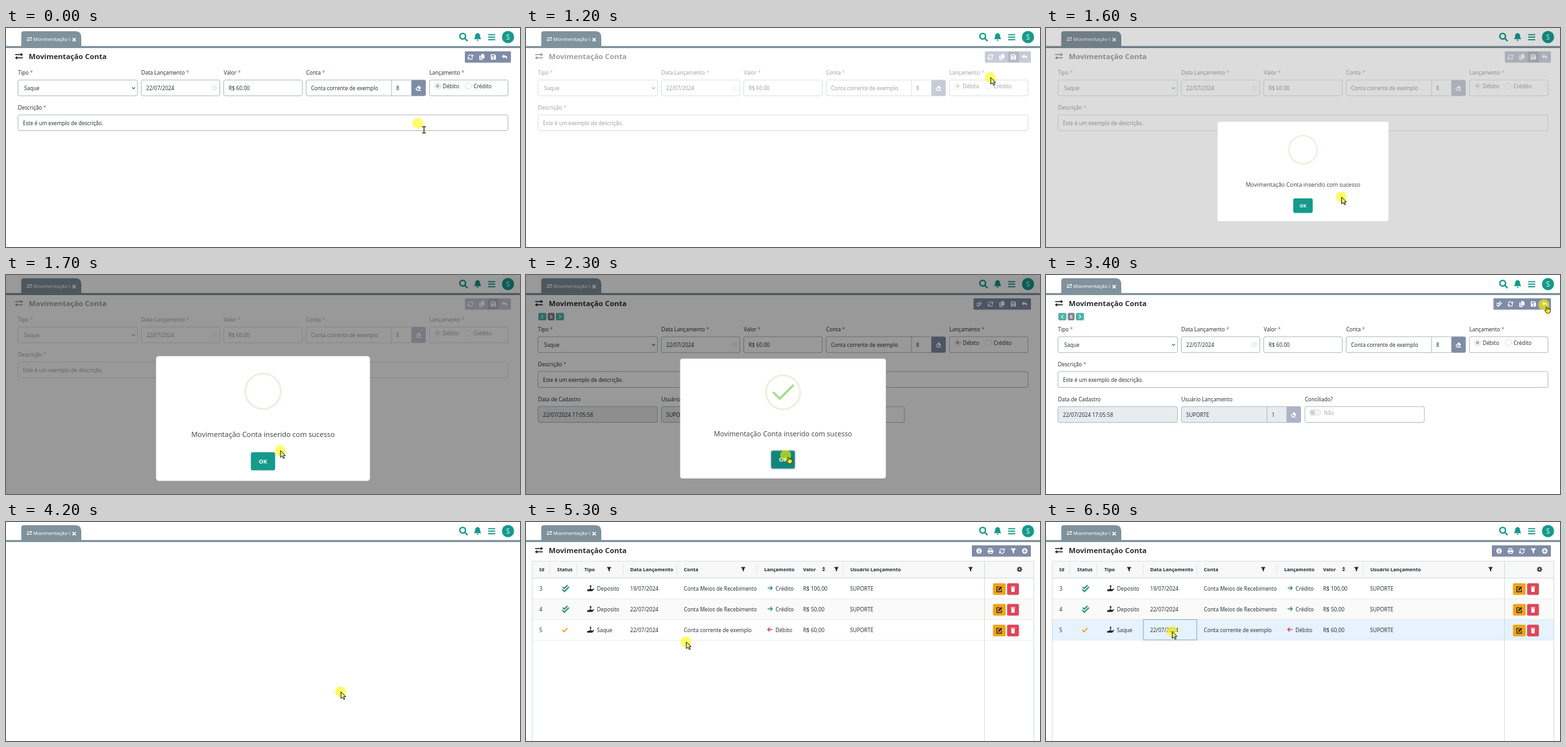
Write an HTML page that moves like this. It is 792 by 338 pixels and loops after 6600 ms.

```html
<!DOCTYPE html>
<html lang="pt-BR">
<head>
<meta charset="utf-8">
<title>Movimentação Conta</title>
<style>
html, body { margin: 0; width: 100%; height: 100%; overflow: hidden; background: #fff; }
svg { display: block; font-family: "Noto Sans", "Open Sans", sans-serif; }
</style>
</head>
<body>
<svg id="stage" width="792" height="338" viewBox="0 0 792 338"></svg>
<script>
const LOOP = 6600;
const INK = '#30343a', TEAL = '#159a8c', SLATE = '#808ca7', BAR = '#80929c', LINE = '#b3babf';
const stage = document.getElementById('stage');

// Icons in a 16 unit box around the origin: s = stroked part, w = its width, f = filled part
const RING = 'M-7.5 0A7.5 7.5 0 1 0 7.5 0A7.5 7.5 0 1 0-7.5 0Z';
const HAND = 'M-8 3H-5L-2 1H2C3 1 3 3 1.5 3H3L7 0C8 0 8.5 1 8 2L4 6.5H-8Z';
const ICONS = {
  swap: { s: 'M-7.5-3.2H5M-5 3.2H7.5', w: 2, f: 'M3.5-6.7L8-3.2L3.5 .3ZM-3.5-.3L-8 3.2L-3.5 6.7Z' },
  close: { s: 'M-5-5L5 5M-5 5L5-5', w: 3.4 },
  search: { s: 'M-6.5-1.5A5 5 0 1 0 3.5-1.5A5 5 0 1 0-6.5-1.5M2.5 2.5L7 7', w: 2.6 },
  bell: { f: 'M0-8C5-7 5-3 5 0L7 4H-7L-5 0C-5-3-5-7 0-8ZM-2 5.5H2A2 2 0 0 1-2 5.5Z' },
  menu: { s: 'M-7-5H7M-7 0H7M-7 5H7', w: 2.3 },
  refresh: { s: 'M-6-1A6 6 0 0 1 5-3.5M6 1A6 6 0 0 1-5 3.5', w: 2, f: 'M7.5-7.5V-1H1ZM-7.5 7.5V1H-1Z' },
  copy: { f: 'M-2-8H4L7-5V4H-2ZM-7-4H-3.5V5.5H3V8H-7Z' },
  save: { f: 'M-7-7H4L7-4V7H-7ZM-4.5-5V-1.5H3V-5ZM0 1A2 2 0 1 0 .01 1Z' },
  undo: { f: 'M-8-1.5L-2-7V-4C5-4 9-1 5 7C6 2 3 1-2 1V4Z' },
  info: { f: RING + 'M-1.2-4.8H1.2V-2.4H-1.2ZM-2-1H1.2V3H2V4.8H-2V3H-1V.8H-2Z' },
  plus: { f: RING + 'M-1.2-4.5H1.2V-1.2H4.5V1.2H1.2V4.5H-1.2V1.2H-4.5V-1.2H-1.2Z' },
  print: { f: 'M-5-7.5H3.5L5-6V-2H-5ZM-3-5.5V-2H3V-5.5ZM-8-2H8V4H5.5V7.5H-5.5V4H-8ZM-3.5 2.5V5.5H3.5V2.5Z' },
  filter: { f: 'M-7-7H7L2 0V7L-2 4V0Z' },
  sort: { f: 'M-4.5-1.5L0-7L4.5-1.5ZM-4.5 1.5L0 7L4.5 1.5Z' },
  gear: { s: 'M-4 0A4 4 0 1 0 4 0A4 4 0 1 0-4 0M0-7.5V-4M0 7.5V4M-7.5 0H-4M7.5 0H4M-5.4-5.4L-3-3M5.4 5.4L3 3M-5.4 5.4L-3 3M5.4-5.4L3-3', w: 2.8 },
  eraser: { f: 'M-8 2L1-7L7.5-.5L1 6H8V7.5H-3.5ZM-5.3 2L-2 5.5H-1L2 2.5L-2-1.3Z' },
  edit: { s: 'M1-5H-6V7H6V1', w: 2, f: 'M-3 4L-2 0L5-7L8-4L1 3Z' },
  trash: { f: 'M-6-7H-2L-1.3-8H1.3L2-7H6V-5H-6ZM-5-4H5L4.3 8H-4.3Z' },
  check: { s: 'M-6 0L-2 4.5L6-4.5', w: 2.6 },
  checks: { s: 'M-7 2L-2.5 6.5L7-3M-6-3L-2.5 0L4-6.5', w: 2.7 },
  deposit: { f: HAND + 'M0-8L3-4.5H1V0H-1V-4.5H-3Z' },
  withdraw: { s: 'M1.8-6C-2-8-2.5-4 0-4S2-.5-1.8-1.8M0-8V0', w: 1.2, f: HAND },
  right: { s: 'M-6 0H6M1-5L6 0L1 5', w: 2.2 },
  left: { s: 'M6 0H-6M-1-5L-6 0L-1 5', w: 2.2 },
  down: { s: 'M-6-3L0 3L6-3', w: 3 },
  prev: { s: 'M3-6L-3 0L3 6', w: 2.4 },
  next: { s: 'M-3-6L3 0L-3 6', w: 2.4 }
};

function el(parent, tag, attrs) {
  const node = document.createElementNS('http://www.w3.org/2000/svg', tag);
  for (const key in attrs) node.setAttribute(key, attrs[key]);
  return parent.appendChild(node);
}
const group = (p, attrs) => el(p, 'g', attrs);
const path = (p, d, stroke, width, fill = 'none') =>
  el(p, 'path', { d, stroke, 'stroke-width': width, fill });
const rect = (p, x, y, x2, y2, fill, rx = 0, stroke = 'none') =>
  el(p, 'rect', { x, y, width: x2 - x, height: y2 - y, fill, rx, stroke });
const circle = (p, cx, cy, r, fill, stroke = 'none', width = 1) =>
  el(p, 'circle', { cx, cy, r, fill, stroke, 'stroke-width': width });

function text(p, x, y, str, o = {}) {
  el(p, 'text', {
    x, y, fill: o.fill || INK, 'font-size': o.size || 8.1,
    'font-weight': o.weight || 400, 'text-anchor': o.anchor || 'start'
  }).textContent = str;
}

function icon(p, name, x, y, size, color) {
  const { s, w, f } = ICONS[name];
  const g = group(p, { transform: `translate(${x} ${y}) scale(${size / 16})` });
  if (f) el(g, 'path', { d: f, fill: color, 'fill-rule': 'evenodd' });
  if (s) path(g, s, color, w);
}

function label(p, x, y, str, required) {
  el(p, 'text', { x, y, fill: INK, 'font-size': 8.1 }).innerHTML =
    str + (required ? ' <tspan fill="#a56b6b">*</tspan>' : '');
}

function field(p, x, x2, y, value, fill = '#fff') {
  rect(p, x, y, x2, y + 24.5, fill, 2.5, LINE);
  text(p, x + 7.5, y + 15.6, value);
}

function lookup(p, x, mid, x2, y, name, id, fill, btn) {
  field(p, x, x2, y, name, fill);
  rect(p, x2 - 22, y, x2, y + 24.5, btn, 2);
  path(p, `M${mid} ${y}V${y + 24.5}`, LINE, 1);
  text(p, mid + 7.3, y + 15.6, id);
  icon(p, 'eraser', x2 - 11, y + 12.5, 9, '#fff');
}

function titleBar(p, left, icons) {
  icon(p, 'swap', 20, 43.5, 12.5, '#222');
  text(p, 35, 47.8, 'Movimentação Conta', { size: 11.3, weight: 600, fill: '#2a2d32' });
  rect(p, left, 36, 778, 53.5, SLATE, 1);
  icons.forEach((name, i) =>
    icon(p, name, 768.5 - (icons.length - 1 - i) * 17.6, 44.8, 9, '#fff'));
}

function radio(p, x, y, str, on) {
  circle(p, x, y, 4.8, '#fff', '#d3d6d9', .9);
  if (on) circle(p, x, y, 2.7, '#b4b6b9');
  text(p, x + 8, y + 3.8, str);
}

function form(p, saved) {
  const g = group(p), body = group(g, { transform: `translate(0 ${saved ? 15 : 0})` });
  titleBar(g, saved ? 689.5 : 707, (saved ? ['checks'] : []).concat('refresh', 'copy', 'save', 'undo'));
  [['Tipo', 18.5], ['Data Lançamento', 208.5], ['Valor', 335.5], ['Conta', 462.5], ['Lançamento', 652.5]]
    .forEach(([s, x]) => label(body, x, 72, s, true));
  field(body, 18.5, 202.5, 80.2, '');
  text(body, 28, 95.8, 'Saque');
  icon(body, 'down', 196.5, 92.7, 6, '#444');
  field(body, 208.5, 329.5, 80.2, '22/07/2024');
  circle(body, 321, 92.6, 3.8, '#f7f9f7', '#dfe6df', .9);
  path(body, 'M321 90.5V92.8L322.3 93.8', '#cfd6cf', .8);
  field(body, 335.5, 456.5, 80.2, 'R$ 60.00');
  lookup(body, 462.5, 594, 646.5, 80.2, 'Conta corrente de exemplo', '8', '#fff', SLATE);
  field(body, 652.5, 773.5, 80.2, '');
  radio(body, 665, 89.5, 'Débito', true);
  radio(body, 712.5, 89.5, 'Crédito', false);
  label(body, 18.5, 126, 'Descrição', true);
  field(body, 18.5, 773.5, 134, 'Este é um exemplo de descrição.');
  if (!saved) return g;

  rect(g, 19, 58.5, 31.5, 70, '#4fb3a6', 2);
  rect(g, 33.5, 58.5, 44, 70, '#7e848e', 2);
  rect(g, 46, 58.5, 58.5, 70, '#4fb3a6', 2);
  icon(g, 'prev', 25.2, 64.3, 7, '#fff');
  icon(g, 'next', 52.3, 64.3, 7, '#fff');
  text(g, 38.8, 67, '5', { size: 7.5, fill: '#fff', weight: 600, anchor: 'middle' });
  label(g, 18.5, 194.5, 'Data de Cadastro');
  label(g, 208.5, 194.5, 'Usuário Lançamento');
  label(g, 399, 194.5, 'Conciliado?');
  field(g, 18.5, 202.5, 203, '22/07/2024 17:05:58', '#e9ecef');
  lookup(g, 208.5, 340.5, 392.5, 203, 'SUPORTE', '1', '#e9ecef', '#adb4c5');
  field(g, 399, 583, 203, '');
  rect(g, 406, 207.5, 423.5, 216.8, '#f4f4f4', 4.6, '#e2e2e2');
  circle(g, 411, 212.2, 3.8, '#d2d2d2');
  text(g, 428, 216, 'Não', { fill: '#a9acb0' });
  return g;
}

// Header
rect(stage, 0, 0, 792, 338, '#fff');
path(stage, 'M23.5 28V9Q23.5 5 27.5 5H107Q116 5 116 14V28Z', 'none', 0, BAR);
rect(stage, 0, 27.8, 792, 31, BAR);
el(el(stage, 'clipPath', { id: 'tab' }), 'rect', { x: 24, y: 5, width: 75, height: 23 });
icon(stage, 'swap', 36, 17, 8.5, '#fff');
text(group(stage, { 'clip-path': 'url(#tab)' }), 42, 19.8, 'Movimentação Conta', { size: 7.6, fill: '#fff' });
icon(stage, 'close', 105, 18, 8, '#fff');
icon(stage, 'search', 705, 14, 14, TEAL);
icon(stage, 'bell', 726.7, 14, 12.5, TEAL);
icon(stage, 'menu', 748.3, 14.2, 12.5, TEAL);
circle(stage, 773.5, 14, 9.4, TEAL);
text(stage, 773.5, 17.6, 'S', { size: 10, fill: '#fff', anchor: 'middle' });

// Form before and after saving
const draft = form(stage, false);
const pressed = group(draft);
rect(pressed, 742.5, 36.5, 759.5, 53, '#5c6579', 1);
icon(pressed, 'save', 750.9, 44.8, 9, '#fff');
const saved = form(stage, true);
const veil = rect(stage, 0, 31, 792, 338, '#fff');

// List
const list = group(stage);
titleBar(list, 687, ['info', 'print', 'refresh', 'filter', 'plus']);
rect(list, 9.5, 60.5, 782.5, 345, '#fff', 0, '#d3dde6');
rect(list, 10, 61, 782, 86, '#f8f8f8');
path(list, 'M10 86.5H782', '#d3dde6', 1);
path(list, [36.5, 78.5, 149.5, 232.5, 355.5, 488.5].map(x => `M${x} 66V81`).join(''), '#dfe3e6', 1);
[['Id', 20.5], ['Status', 48], ['Tipo', 90], ['Data Lançamento', 160.5], ['Conta', 243.3],
 ['Lançamento', 367], ['Valor', 427], ['Usuário Lançamento', 499.7]]
  .forEach(([s, x]) => text(list, x, 76, s, { size: 7.5, weight: 600, fill: '#25282c' }));
[128, 334.7, 478.3, 685].forEach(x => icon(list, 'filter', x, 73, 8, '#222'));
icon(list, 'sort', 458.7, 72.8, 8, '#222');
icon(list, 'gear', 760.5, 73, 8.5, '#222');

const rows = group(list);
rect(rows, 10, 118, 782, 150, '#fafaf9');
const hover = rect(rows, 10, 150, 782, 182, '#e6f2fd');
path(rows, 'M10 118.5H782M10 150.5H782M10 182.5H782', '#e4e8ec', .8);
const cell = rect(rows, 150, 150.5, 232.3, 182, 'none', 0, '#86abd0');
[['3', '19/07/2024', 'R$ 100,00'], ['4', '22/07/2024', 'R$ 50,00'], ['5', '22/07/2024', 'R$ 60,00']]
  .forEach(([id, date, value], i) => {
    const y = 102.4 + i * 32, out = i === 2;
    const put = (x, s) => text(rows, x, y + 3.2, s, { size: 8.2 });
    put(20.5, id);
    icon(rows, out ? 'check' : 'checks', out ? 60 : 61, y, out ? 10.5 : 12, out ? '#f0a31f' : '#2f8f7d');
    icon(rows, out ? 'withdraw' : 'deposit', 99.5, y, 10.5, '#222');
    put(109.3, out ? 'Saque' : 'Deposito');
    put(160.5, date);
    put(243.3, out ? 'Conta corrente de exemplo' : 'Conta Meios de Recebimento');
    icon(rows, out ? 'left' : 'right', 376, y - .4, 9.5, out ? '#d9405a' : '#2f8f7d');
    put(384.5, out ? 'Débito' : 'Crédito');
    put(427, value);
    put(499.3, 'SUPORTE');
    rect(rows, 719.5, y - 8, 739, y + 10, '#efa31d', 2);
    icon(rows, 'edit', 729, y + 1, 9.5, '#222');
    rect(rows, 741.3, y - 8, 759.5, y + 10, '#df4459', 2);
    icon(rows, 'trash', 750.4, y + 1, 9, '#fff');
  });
path(list, 'M706.5 61V338', '#d3dde6', 1);

// Success dialog
const shade = rect(stage, 0, 0, 792, 338, '#000');
const modal = group(stage);
rect(modal, 237.5, 129, 554.5, 314, '#fff', 4);
circle(modal, 396, 181, 26.3, 'none', '#e6f2dc', 2.6);
const tick = path(modal, 'M381.5 181.5L391 191L411.5 170.5', '#a5dc86', 3.2);
tick.setAttribute('stroke-linecap', 'round');
tick.setAttribute('stroke-dasharray', '43 60');
text(modal, 396, 249.3, 'Movimentação Conta inserido com sucesso', { size: 10.49, fill: '#4a4c50', anchor: 'middle' });
const ring = rect(modal, 376.5, 270, 415.5, 300, '#b9c3da', 4);
const ok = rect(modal, 378, 271.5, 414, 298.5, TEAL, 3);
text(modal, 396, 288.4, 'OK', { size: 8.6, weight: 700, fill: '#fff', anchor: 'middle' });

// Pointer
const pointer = group(stage);
circle(pointer, 0, 0, 8.4, 'rgba(255,252,0,.58)');
const shapes = {
  beam: path(pointer, 'M6.5 5.3H12.7M9.6 5.3V15M6.5 15H12.7', '#5c5420', 1.7),
  hand: path(pointer, 'M3.5 3.5C4.6 3 5 4 5.4 6L10.3 7V10L8.6 13H4.6L1.3 9C2 7.8 3 8.4 3.9 9Z', '#222', .9, '#ffe81a'),
  arrow: path(pointer, 'M.5 0V10.5L3 8.3L5 12L6.6 11.2L4.8 7.6H8Z', '#1c1c1c', 1, '#f6f08c')
};

const TRACK = [
  [0, 634.5, 147], [40, 634.5, 147], [520, 756, 46], [860, 756, 46], [900, 757, 47], [1080, 757, 47],
  [1600, 455, 261], [1780, 400, 278], [2320, 400, 278], [2420, 400, 280.5], [2500, 400, 280.5],
  [3120, 768, 48], [3180, 768, 48], [3400, 767, 46], [3600, 767, 46], [4200, 515.5, 262],
  [5030, 515.5, 262], [5300, 246.5, 185], [5500, 190, 169], [5740, 190, 169],
  [6040, 510, 169.5], [6320, 190, 169], [6430, 190, 169], [6500, 194, 169], [6600, 194, 169]
];
const CURSORS = [[0, 'beam'], [110, 'arrow'], [430, 'hand'], [1130, 'arrow'], [1780, 'hand'],
  [2420, 'arrow'], [3050, 'hand'], [3690, 'arrow']];

const ramp = (t, a, b) => Math.min(1, Math.max(0, (t - a) / (b - a)));
const ease = u => u * u * (3 - 2 * u);
const show = (node, on) => node.setAttribute('display', on ? 'inline' : 'none');

function at(track, t) {
  const i = Math.max(1, track.findIndex(k => k[0] >= t));
  const a = track[i - 1], b = track[i], u = ease(ramp(t, a[0], b[0]));
  return a.slice(1).map((v, n) => v + (b[n + 1] - v) * u);
}

const POP = [[1545, .7], [1680, 1.05], [1785, .95], [1845, 1], [2350, 1], [2480, .5], [LOOP, .5]];

function draw(t) {
  show(draft, t < 1780);
  show(pressed, t >= 900);
  show(saved, t >= 1780 && t < 3700);
  veil.setAttribute('opacity', t < 1780 ? .55 * ramp(t, 1060, 1200) : t < 3700 ? .55 * ramp(t, 3590, 3690) : 0);

  show(list, t >= 4390);
  list.setAttribute('opacity', ramp(t, 4300, 4700));
  show(rows, t >= 5090);
  show(hover, t >= 5390);
  show(cell, t >= 5490);

  const fade = 1 - ramp(t, 2360, 2480);
  shade.setAttribute('opacity', .4 * ramp(t, 1560, 1680) * fade);
  show(modal, t >= 1545 && t < 2480);
  const scale = t < 1545 ? .7 : at(POP, t)[0];
  modal.setAttribute('transform', `translate(396 221.5) scale(${scale}) translate(-396 -221.5)`);
  modal.setAttribute('opacity', fade);
  show(tick, t > 1850);
  tick.setAttribute('stroke-dashoffset', 43 * (1 - ease(ramp(t, 1850, 2150))));
  show(ring, t >= 1800);
  ok.setAttribute('fill', t >= 1800 ? '#12857b' : TEAL);

  const [x, y] = at(TRACK, t);
  pointer.setAttribute('transform', `translate(${x.toFixed(2)} ${y.toFixed(2)})`);
  const kind = CURSORS.filter(c => c[0] <= t).pop()[1];
  for (const name in shapes) show(shapes[name], name === kind);
}

const start = performance.now();
function tickFrame() {
  draw((performance.now() - start) % LOOP);
  requestAnimationFrame(tickFrame);
}
tickFrame();
</script>
</body>
</html>
```
